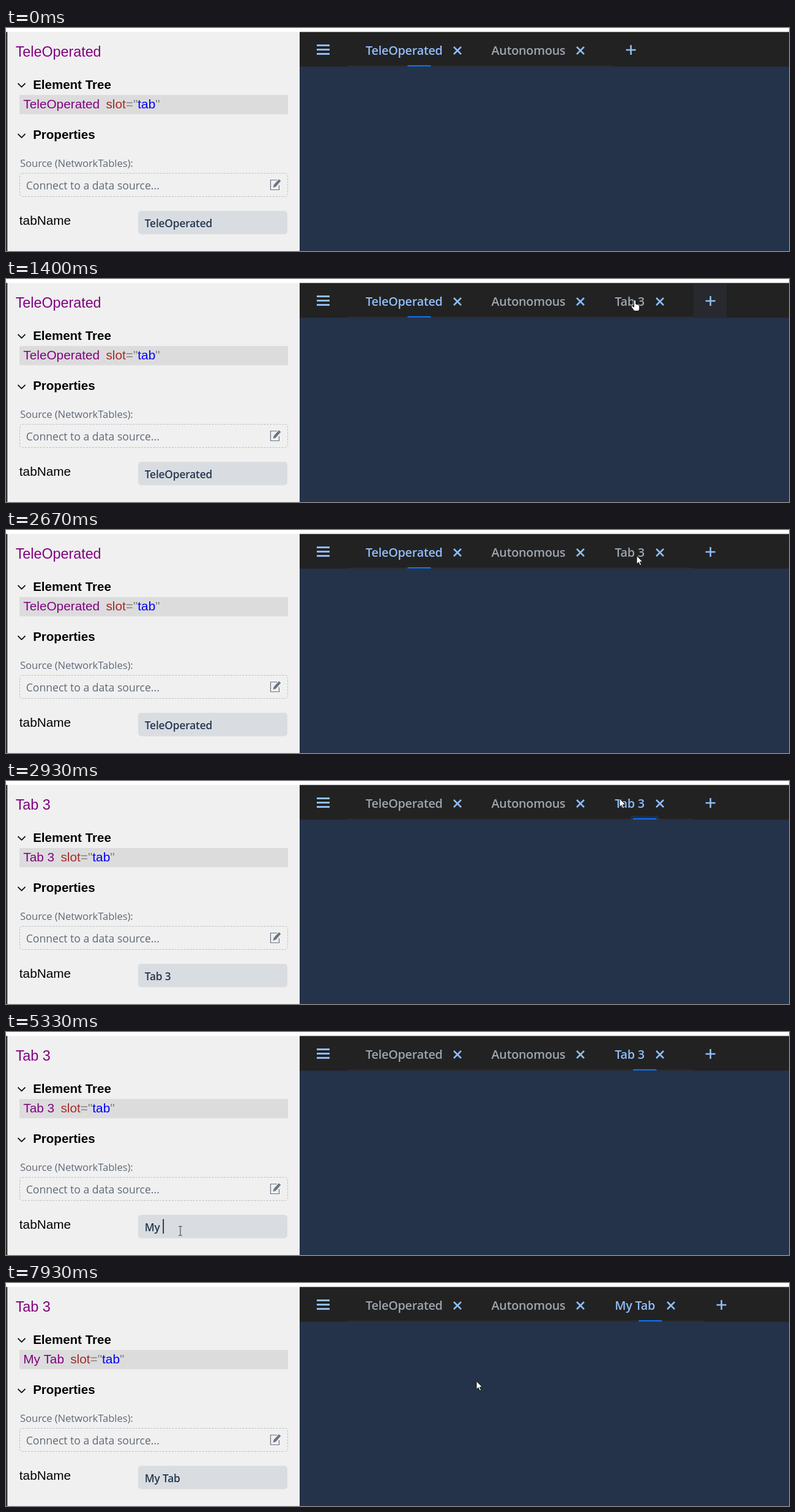
An HTML page that plays this animation: 1280 by 366 pixels, repeating every 8 s.

```html
<!DOCTYPE html>
<html lang="en">
<head>
<meta charset="utf-8">
<title>Adding and renaming a tab</title>
<style>
  html, body { margin: 0; width: 100%; height: 100%; overflow: hidden; background: #fff; }
  svg { display: block; width: 100%; height: 100%; }
  text { white-space: pre; font: 20.8px "Liberation Sans", Arial, sans-serif; }
  .head { font-weight: 700; font-size: 20.5px; }
  .ui { font: 500 17.6px "Open Sans", "Noto Sans", sans-serif; }
  .label { font-size: 16.7px; letter-spacing: -.007em; }
  .value { font-weight: 600; font-size: 17.4px; letter-spacing: -.012em; }
  .tab { font-weight: 600; font-size: 19.8px; letter-spacing: -.012em; fill: #9ca5b0; }
  .tab.on { fill: #90bdf9; }
  .line { fill: none; stroke: #90bdf9; stroke-width: 2.6; }
  .chevron { fill: none; stroke: #111; stroke-width: 1.9; stroke-linecap: round; stroke-linejoin: round; }
  .mouse { stroke: #111; stroke-width: 1; stroke-linejoin: round; fill: #fff; }
</style>
</head>
<body>
<svg viewBox="0 0 1280 366">
  <defs>
    <path id="cross" class="line" d="M-6 -6L6 6M6 -6L-6 6"/>
    <path id="chev" class="chevron" d="M-5.5 -2.7L0 2.8L5.5 -2.7"/>
  </defs>

  <!-- side panel -->
  <rect y="6.5" width="480" height="359.5" fill="#f0f0f0"/>
  <rect y="6.5" width="2.3" height="359.5" fill="#333"/>
  <text id="title" x="15.7" y="47" style="font-size:23.3px" fill="purple"></text>
  <use href="#chev" x="25.5" y="94"/>
  <text class="head" x="44.2" y="99.5">Element Tree</text>
  <rect x="22" y="110" width="439" height="31.5" fill="#dcdcdc"/>
  <text x="28.3" y="132" fill="gray"><tspan id="node" fill="purple"></tspan><tspan dx="10.2" fill="brown">slot</tspan>="<tspan fill="blue">tab</tspan>"</text>
  <use href="#chev" x="25.5" y="177"/>
  <text class="head" x="44.2" y="182">Properties</text>
  <text class="ui label" x="23" y="227.5" fill="#5f6a79">Source (NetworkTables):</text>
  <rect x="22.5" y="238.5" width="438" height="38" rx="4" fill="none" stroke="#b8bec6" stroke-dasharray="3 2"/>
  <text class="ui" x="32.7" y="264.5" fill="#5f6a79">Connect to a data source...</text>
  <g fill="none" stroke="#6a7583" stroke-width="1.2">
    <path d="M443 249.5H432.5V265.5H446.5V258"/>
    <path d="M437 261.5L438 257.5L446 248.5L449 251L441 260.2Z" fill="#6a7583" stroke-width=".6"/>
  </g>
  <text x="21.8" y="323">tabName</text>
  <rect x="216" y="300" width="244" height="38.5" rx="5" fill="#d9dde1"/>
  <rect id="sel" y="307" height="24" fill="#0078d7"/>
  <text class="ui value" x="226.7" y="326.5"><tspan id="valueA"></tspan><tspan id="valueB"></tspan></text>
  <rect id="caret" y="307" width="1.8" height="24" fill="#1c2d45"/>

  <!-- dashboard -->
  <rect x="480" y="6.5" width="800" height="57.5" fill="#222"/>
  <rect x="480" y="63.5" width="800" height="302.5" fill="#243349"/>
  <rect id="hover" y="8" width="54" height="55" fill="#27292e"/>
  <rect id="rule" x="557" y="62" height="1" fill="#343231"/>
  <path class="line" d="M508 28.5H529M508 35.5H529M508 42.5H529" style="stroke-width:3"/>
  <text id="tab1" class="ui tab" x="588" y="43.5">TeleOperated</text>
  <use href="#cross" x="738" y="37"/>
  <text class="ui tab" x="793.5" y="43.5">Autonomous</text>
  <use href="#cross" x="939" y="37"/>
  <g id="third">
    <text id="tab3" class="ui tab" x="995.2" y="43.5"></text>
    <use id="close3" href="#cross" y="37"/>
  </g>
  <path id="plus" class="line" d="M-8 0H8M0 -8V8"/>
  <path id="halo" d="M-4 63.5V61Q-4 57 0 57H39Q43 57 43 61V63.5Z" fill="#1676f3"/>
  <path id="mark" d="M0 63.2V63Q0 61 2 61H37Q39 61 39 63V63.2Z" fill="#1270ee"/>

  <!-- mouse -->
  <g id="mouse">
    <path id="arrow" class="mouse" d="M0 0V13.6L3.2 10.8L5.4 15.8L7.7 14.8L5.5 9.9H9.8Z"/>
    <path id="hand" class="mouse" d="M-1.6 1.6a1.6 1.6 0 0 1 3.2 0V6.6L5.5 7.6Q7.6 8.2 7.6 10.5V13Q7.6 18 4 18H.5Q-1.5 18 -2.5 16L-6 11Q-5.5 9 -3.5 10L-1.6 11.6Z"/>
    <path id="beam" d="M-3 -7H-1L0 -6L1 -7H3M0 -6V7M-3 8H-1L0 7L1 8H3" fill="none" stroke="#444" stroke-width="1.1"/>
  </g>
</svg>
<script>
const LOOP = 8000, FPS = 15;
const $ = id => document.getElementById(id);

// Mouse path: step, x, y
const path = [
  [2, 1268, 350], [5, 1120, 250], [8, 950, 130], [10, 890, 75], [12, 930, 50], [14, 1026, 36],
  [15, 1023, 32], [16, 1023, 32], [17, 1028, 34.5], [21, 1028, 34.5],
  [24, 800, 17], [26, 506, 45], [28, 540, 150], [30, 740, 168], [33, 968, 94],
  [37, 1058, 55], [41, 1022, 38], [44, 1003, 29], [46, 1001, 32],
  [50, 800, 150], [54, 480, 346], [57, 290, 332], [58, 285, 326],
  [108, 285, 326], [112, 400, 270], [116, 700, 185], [119, 769, 161]
];

// Typed text: step, value, caret x
const typing = [
  [73, "M", 242], [78, "My", 251.5], [80, "My ", 256.3],
  [85, "My T", 266], [88, "My Ta", 275.5], [90, "My Tab", 285.3]
];

const ADD = 21, SELECT = 41, WORD = 59, ALL = 61, TYPE = 73, RENAME = 99;
const within = (v, a, b) => v >= a && v < b;
const show = (id, on) => $(id).style.display = on ? "" : "none";
const move = (id, x, y = 0) => $(id).setAttribute("transform", `translate(${x} ${y})`);
const attr = (id, name, value) => $(id).setAttribute(name, value);
const write = (id, s) => { if ($(id).textContent !== s) $(id).textContent = s; };

function mouseAt(step) {
  let i = 0;
  while (i < path.length - 2 && path[i + 1][0] <= step) i++;
  const [n0, x0, y0] = path[i], [n1, x1, y1] = path[i + 1];
  const k = Math.max(0, Math.min(1, (step - n0) / (n1 - n0)));
  return [x0 + (x1 - x0) * k, y0 + (y1 - y0) * k];
}

function drawMouse(step) {
  const [x, y] = mouseAt(step);
  const hand = step <= ADD && within(x, 994, 1048) && within(y, 8, 63);
  const beam = within(x, 216, 460) && within(y, 300, 338);
  show("mouse", step >= 2);
  move("mouse", x, y);
  show("hand", hand);
  show("beam", beam);
  show("arrow", !hand && !beam);
  return hand;
}

function drawTabs(step, overPlus) {
  const added = step >= ADD, selected = step >= SELECT;
  const grow = step >= RENAME ? 18 : 0;
  const end = added ? 1124 + grow : 994;
  const markX = selected ? 1024.7 + grow / 2 : 656;
  show("third", added);
  write("tab3", grow ? "My Tab" : "Tab 3");
  attr("close3", "x", 1069 + grow);
  move("plus", end + 27.6, 36);
  attr("rule", "width", end - 557);
  attr("hover", "x", end);
  show("hover", overPlus);
  $("tab1").classList.toggle("on", !selected);
  $("tab3").classList.toggle("on", selected);
  move("mark", markX);
  move("halo", markX);
  const fade = 1 - Math.max(0, (step - SELECT) / FPS - .17) / .8;
  attr("halo", "opacity", selected ? .15 * Math.max(0, fade) : 0);
}

function drawPanel(step) {
  const name = step >= SELECT ? "Tab 3" : "TeleOperated";
  const typed = typing.filter(t => t[0] <= step).pop();
  const all = within(step, ALL, TYPE), word = within(step, WORD, TYPE);
  write("title", name);
  write("node", step >= RENAME ? "My Tab" : name);
  // The last digit is its own run so that it can be highlighted alone
  const split = name === "Tab 3" && !typed;
  write("valueA", typed ? typed[1] : split ? "Tab " : name);
  write("valueB", split ? "3" : "");
  attr("valueA", "fill", all ? "#fff" : "#263850");
  attr("valueB", "fill", word ? "#fff" : "#263850");
  show("sel", word);
  attr("sel", "x", all ? 226 : 260);
  attr("sel", "width", all ? 44 : 10);
  show("caret", step === 58 || within(step, TYPE, 98) || within(step, 106, 114));
  attr("caret", "x", typed ? typed[2] : 270);
}

function frame() {
  const t = performance.now() % LOOP;
  const step = Math.min(119, Math.floor((t + 7) * FPS / 1000));
  drawTabs(step, drawMouse(step));
  drawPanel(step);
  requestAnimationFrame(frame);
}
frame();
</script>
</body>
</html>
```
